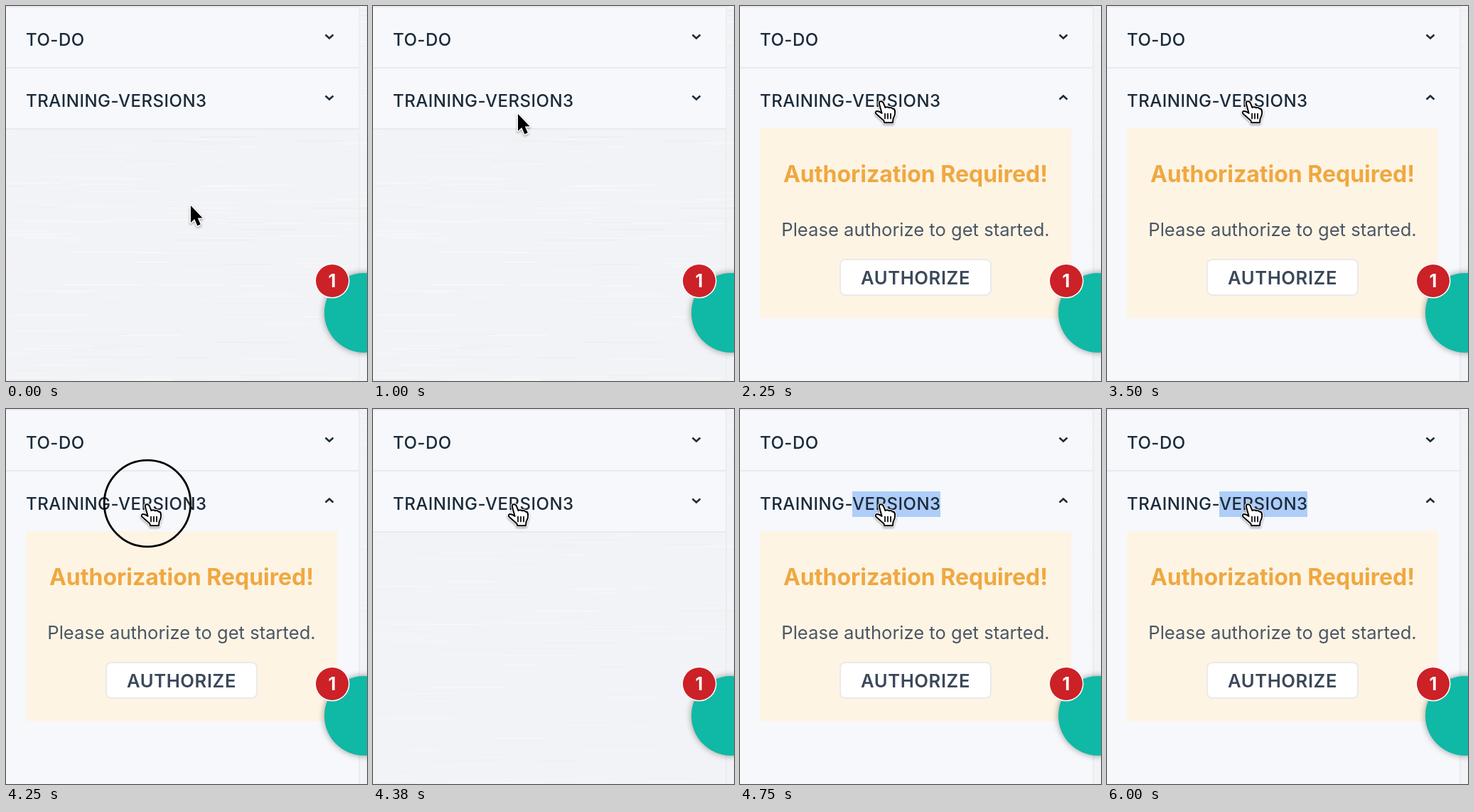
Recreate the animation shown at these times as an HTML page with a canvas. Size 508 by 528 pixels, loop 6.12 s.

```html
<!DOCTYPE html>
<html lang="en">
<head>
<meta charset="utf-8">
<title>Accordion demo</title>
<style>
  html, body { margin: 0; width: 100%; height: 100%; overflow: hidden; background: #f2f3f6; }
  canvas { display: block; }
</style>
</head>
<body>
<canvas id="stage" width="508" height="528"></canvas>
<script>
const ctx = document.getElementById('stage').getContext('2d');
const LOOP = 6120, STEP = 125;
const INK = '#1c2b3a', LINE = '#e7eaef', SURFACE = '#f6f8fc';

const ARROW = new Path2D('M1 3V27L6.3 22L10.3 31.5L14.8 29.6L10.8 20.5H17.6Z');
const HAND = new Path2D(
  'M-3 5Q-4 1.2-0.7 1.2Q2 1 3 4.2L5.5 10Q8 8.4 11 10.3Q14 9.2 15.6 11.6' +
  'Q18.6 11.3 19 15Q19.8 20 16.6 25.5L16 31.2H4L3.4 28.4Q-0.5 25-7 19.3' +
  'Q-9.6 16.6-7 15.2Q-4 14.5 0.6 18Z');
const FINGERS = new Path2D('M5 18.5V25.5M9 18.5V25.5M13 18.5V25.5');

function seeded(seed) {
  return () => (seed = (seed * 16807) % 2147483647) / 2147483647;
}

function box(x, y, w, h, color) {
  ctx.fillStyle = color;
  ctx.fillRect(x, y, w, h);
}

function disc(x, y, r, color) {
  ctx.fillStyle = color;
  ctx.beginPath();
  ctx.arc(x, y, r, 0, 2 * Math.PI);
  ctx.fill();
}

function text(str, x, y, font, color, align = 'left', spacing = 0) {
  ctx.font = font + ' Inter, sans-serif';
  ctx.textAlign = align;
  ctx.letterSpacing = spacing + 'px';
  ctx.fillStyle = color;
  ctx.fillText(str, x, y);
}

function backdrop(strength) {
  box(0, 0, 508, 528, '#f2f3f6');
  const rand = seeded(91);
  for (let i = 0; i < 260; i++) {
    const x = rand() * 560 - 60, y = Math.floor(rand() * 528);
    const shade = rand() < 0.75 ? '255,255,255' : '225,229,236';
    box(x, y, 30 + rand() * 110, 1, `rgba(${shade},${strength * rand()})`);
  }
}

function chevron(y, up) {
  const d = up ? -2.5 : 2.5;
  ctx.strokeStyle = INK;
  ctx.lineWidth = 2.6;
  ctx.lineCap = 'butt';
  ctx.lineJoin = 'miter';
  ctx.beginPath();
  ctx.moveTo(449.5, y - d);
  ctx.lineTo(455, y + d);
  ctx.lineTo(460.5, y - d);
  ctx.stroke();
}

function row(label, y, open) {
  box(0, y, 497, 2, LINE);
  text(label, 28, y + 56, '500 24px', INK, 'left', 0.5);
  chevron(y + 43, open);
}

function notice() {
  box(28, 172, 438, 268, '#fdf4e4');
  text('Authorization Required!', 247, 248, '700 32px', '#efa841', 'center');
  text('Please authorize to get started.', 247, 324, '400 25.6px', '#4b5664', 'center');
  ctx.beginPath();
  ctx.roundRect(141, 357, 212, 50, 7);
  ctx.fillStyle = '#fff';
  ctx.fill();
  ctx.strokeStyle = '#ebeaea';
  ctx.lineWidth = 2;
  ctx.stroke();
  text('AUTHORIZE', 247, 392, '600 25.6px', '#3b4859', 'center', 0.6);
}

function floatingButton() {
  ctx.save();
  ctx.shadowColor = 'rgba(0,0,0,.4)';
  ctx.shadowBlur = 10;
  disc(504, 432, 56, '#0fb9a6');
  ctx.restore();
  disc(459, 387, 24.5, '#fff');
  disc(459, 387, 23, '#cb2127');
  text('1', 459, 396, '700 25px', '#fff', 'center');
}

const smooth = (a, b, t) => {
  const s = Math.min(1, Math.max(0, (t - a) / (b - a)));
  return s * s * (3 - 2 * s);
};

function pointerAt(t) {
  const a = smooth(375, 1000, t), b = smooth(1000, 1250, t), c = smooth(1375, 1875, t);
  return [259 - 56 * a - b - 3 * c, 278 - 129 * a - 8 * b - 8 * c];
}

function pointer(t) {
  const isHand = t >= 1500;
  const shape = isHand ? HAND : ARROW;
  ctx.save();
  ctx.translate(...pointerAt(t));
  ctx.lineJoin = 'round';
  ctx.lineCap = 'round';
  ctx.shadowColor = 'rgba(0,0,0,.35)';
  ctx.shadowBlur = 3;
  ctx.shadowOffsetY = 1.5;
  ctx.strokeStyle = '#fff';
  ctx.lineWidth = isHand ? 4 : 3;
  ctx.stroke(shape);
  ctx.shadowColor = 'transparent';
  ctx.fillStyle = isHand ? '#fff' : '#000';
  ctx.fill(shape);
  if (isHand) {
    ctx.strokeStyle = '#000';
    ctx.lineWidth = 2;
    ctx.stroke(shape);
    ctx.lineWidth = 1.7;
    ctx.stroke(FINGERS);
  }
  ctx.restore();
}

function clickRing() {
  ctx.strokeStyle = '#000';
  ctx.lineWidth = 2.8;
  ctx.beginPath();
  ctx.arc(199, 133, 60.8, 0, 2 * Math.PI);
  ctx.stroke();
}

function draw(time) {
  const step = Math.floor((time % LOOP) / STEP);
  const selected = step >= 37;
  const open = (step >= 18 && step < 35) || selected;

  backdrop(step < 18 ? 0.6 : 0.35);
  box(0, 0, 497, open ? 528 : 173, SURFACE);
  box(496, 0, 2, 528, open || step >= 35 ? '#eaecf0' : '#eceef2');
  if (selected) box(158, 116, 124, 36, '#aecdf8');
  row('TO-DO', 0, false);
  row('TRAINING-VERSION3', 86, open);
  if (open) notice();
  else box(0, 172, 497, 2, LINE);
  floatingButton();
  if ([17, 34, 36].includes(step)) clickRing();
  pointer(step * STEP);
}

function frame() {
  draw(performance.now());
  requestAnimationFrame(frame);
}
frame();
</script>
</body>
</html>
```
